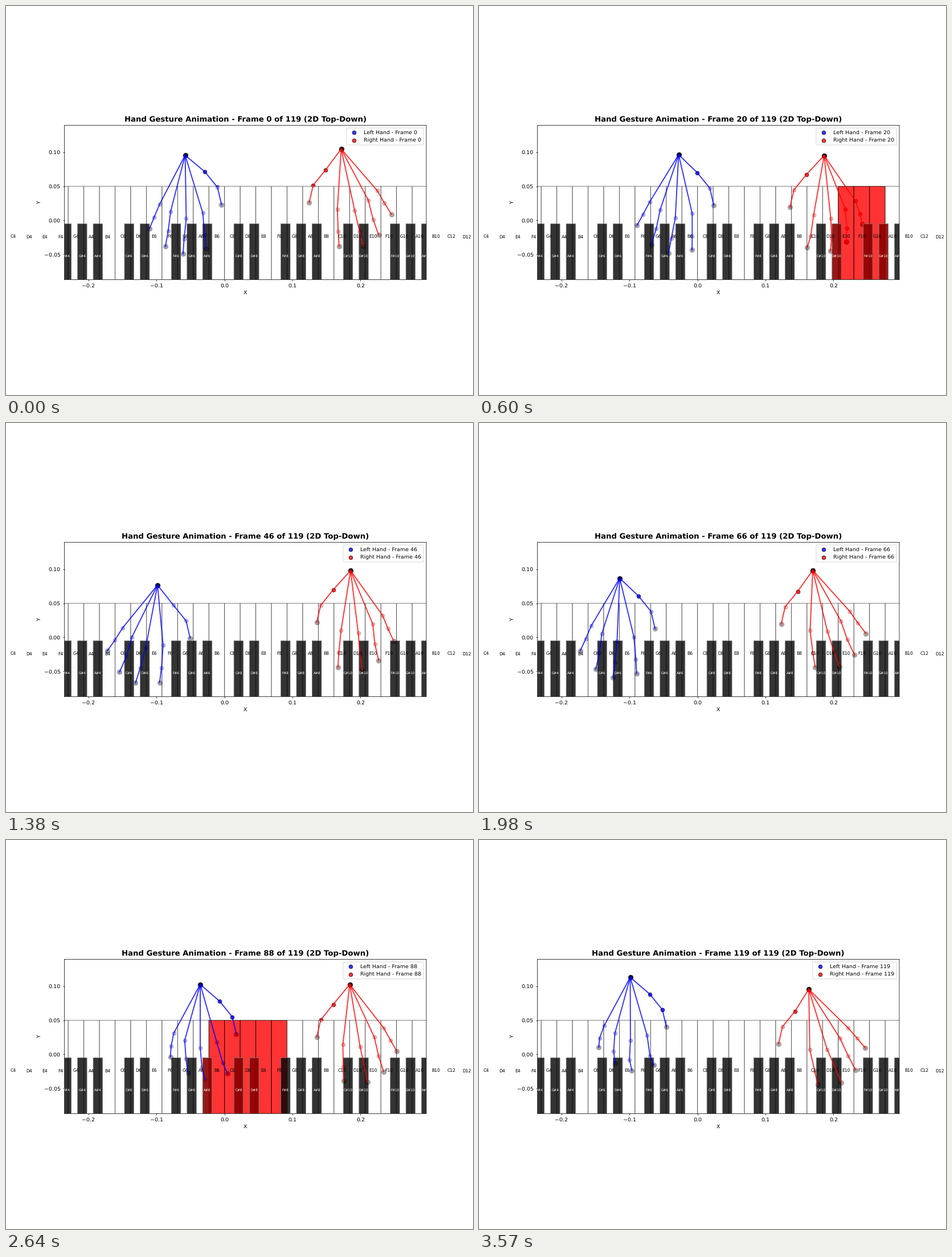
Recreate the animation shown at these times as a matplotlib script. Size 820 by 683 pixels, loop 3600 ms.

```python
import numpy as np
import matplotlib.pyplot as plt
from matplotlib.animation import FuncAnimation
from matplotlib.patches import Rectangle

FRAMES, INTERVAL = 120, 30
DPI = 820 / 12
SCALE, X0, Y0 = 1193.75, 383.7, 376.3   # stage pixels per unit, origin
KEY_W, KEY_BOTTOM = 0.023, -0.1
SEMITONES = dict(C=0, D=2, E=4, F=5, G=7, A=9, B=11)

# Left-hand bones from the wrist outwards: (length, angle from straight down).
# The right hand is the mirror image.
FINGERS = {
    "thumb": [(45.5, 50), (35, 39), (31, 13)],
    "index": [(106, 17), (39, 5), (24, 6)],
    "middle": [(111, 1), (36.5, -6), (26, -4)],
    "ring": [(102, -14.5), (34, -7), (28, -10)],
    "pinky": [(97, -27.5), (24.5, -23), (22, -22)],
}

# Key points: frame, wrist x, wrist y, palm turn, finger lean, finger reach.
LEFT_KEYS = [
    (0, 314.5, 262, 0, 0, 1),
    (20, 350.5, 261, -4, -5, 1.03),
    (36, 346, 263, -4.5, -5, 1.05),
    (46, 266, 284.5, -11.7, -9, 1.08),
    (54, 190, 280, -8, -5, 1.07),
    (66, 247, 272.5, -3.4, 0, 1.05),
    (72, 289, 264, -2.5, 4.5, 0.97),
    (88, 341, 253.5, -1, 11, 0.87),
    (105, 307.5, 244, 0.5, 16, 0.45),
    (119, 265.5, 241, -0.8, 3, 0.75),
]
RIGHT_KEYS = [
    (0, 588.5, 251, -13.4, -7, 1.05),
    (20, 606, 262.5, -7, 3, 0.86),
    (46, 605, 259, -8, 1, 1.07),
    (54, 645, 259, -11, -6, 1.06),
    (66, 586, 258.5, -14.5, -12, 1.06),
    (88, 603.5, 253.5, -10.5, -6, 1.03),
    (105, 592, 250.5, -10.5, -8, 1.05),
    (119, 579, 262, -18, -18, 1),
]

# First frame, last frame, lowest and highest pressed semitone.
PRESSES = [(16, 27, 39, 44), (28, 36, 40, 46), (82, 89, 22, 29)]


def smooth_path(keys):
    """Monotone cubic path through the key points, sampled once per frame."""
    keys = np.array(keys, float)
    t, values = keys[:, 0], keys[:, 1:]
    h = np.diff(t)[:, None]
    d = np.diff(values, axis=0) / h
    same = d[:-1] * d[1:] > 0
    total = np.where(same, d[:-1] + d[1:], 1)
    slope = np.zeros_like(values)
    slope[1:-1] = np.where(same, 2 * d[:-1] * d[1:] / total, 0)

    f = np.arange(FRAMES)
    k = np.clip(np.searchsorted(t, f, side="right") - 1, 0, len(t) - 2)
    u = ((f - t[k]) / h[k, 0])[:, None]
    return ((1 + 2 * u) * (1 - u) ** 2 * values[k]
            + u * (1 - u) ** 2 * h[k] * slope[k]
            + u ** 2 * (3 - 2 * u) * values[k + 1]
            + u ** 2 * (u - 1) * h[k] * slope[k + 1])


def hand_pose(x, y, turn, lean, reach, mirror):
    """Joints of all fingers in data units, shaped (finger, joint, xy)."""
    curl = 1 - reach
    pose = []
    for name, bones in FINGERS.items():
        (l1, a1), (l2, a2), (l3, a3) = bones
        a1 += turn
        if name != "thumb":
            l2, a2 = l2 * (1 - 0.3 * curl), a2 + lean
            l3, a3 = l3 * reach, a3 + lean + 55 * curl
        length, angle = np.array([l1, l2, l3]), np.radians([a1, a2, a3])
        dx = mirror * np.cumsum(np.append(0, length * np.sin(angle)))
        dy = np.cumsum(np.append(0, length * np.cos(angle)))
        pose.append(np.column_stack([(x + dx - X0) / SCALE, (Y0 - y - dy) / SCALE]))
    return np.array(pose)


class Hand:
    def __init__(self, ax, name, color, keys, mirror):
        self.name, self.path, self.mirror = name, smooth_path(keys), mirror
        self.lines = [ax.plot([], [], color=color, lw=2, alpha=0.8, zorder=2)[0]
                      for _ in FINGERS]
        self.joints = ax.scatter([], [], s=50, c=color, edgecolors="black",
                                 linewidths=0.9, alpha=0.8, zorder=1, label=name)
        self.ends = ax.scatter([], [], s=80, c="black", edgecolors="black",
                               linewidths=1, alpha=0.7, zorder=1.05)

    def update(self, frame):
        fingers = hand_pose(*self.path[frame], self.mirror)
        for line, pts in zip(self.lines, fingers):
            line.set_data(pts[:, 0], pts[:, 1])
        wrist = fingers[0, :1]
        self.joints.set_offsets(np.vstack([wrist, fingers[:, 1:].reshape(-1, 2)]))
        self.ends.set_offsets(np.vstack([wrist, fingers[:, 3]]))


def add_key(ax, x, width, top, label, size, color, zorder):
    key = Rectangle((x, KEY_BOTTOM), width, top - KEY_BOTTOM, zorder=zorder)
    ax.add_patch(key)
    ax.text(x + width / 2, (top + KEY_BOTTOM) / 2, label, fontsize=size,
            color=color, ha="center", va="center", zorder=3)
    return key


def style(key, face, edge, alpha, lw):
    key.set(facecolor=face, edgecolor=edge, alpha=alpha, linewidth=lw)


# Soft, unsnapped lines and unhinted text.
plt.rcParams.update({"path.snap": False, "text.hinting": "no_hinting"})

# The small excess keeps the pixel size from rounding down.
fig = plt.figure(figsize=(820.001 / DPI, 683.001 / DPI), dpi=DPI, facecolor="white")
ax = fig.add_subplot()
ax.set_xlim(-0.2356, 0.2968)
ax.set_ylim(-0.0872, 0.1398)
ax.set_aspect("equal")
ax.set_xticks([-0.2, -0.1, 0, 0.1, 0.2])
ax.set_yticks([-0.05, 0, 0.05, 0.1])
ax.set_xlabel("X")
ax.set_ylabel("Y")
title = ax.set_title("", fontsize=14, fontweight="bold")

hands = [Hand(ax, "Left Hand", "blue", LEFT_KEYS, 1),
         Hand(ax, "Right Hand", "red", RIGHT_KEYS, -1)]

# Keys by semitone, counted from the lowest C.
white_keys, black_keys = {}, {}
for i in range(30):
    octave, step = divmod(i, 7)
    note, number = "CDEFGAB"[step], 4 + 2 * octave
    x, tone = (i - 14) * KEY_W, 12 * octave + SEMITONES[note]
    white_keys[tone] = add_key(ax, x, KEY_W, 0.05, f"{note}{number}", 8, "black", 1.1)
    if note not in "EB":
        black_keys[tone + 1] = add_key(ax, x + 0.6 * KEY_W, 0.6 * KEY_W, -0.005,
                                       f"{note}#{number}", 6, "white", 1.2)

legend = ax.legend(handles=[h.joints for h in hands], loc="upper right")


def update(frame):
    title.set_text(f"Hand Gesture Animation - Frame {frame} of {FRAMES - 1} (2D Top-Down)")
    for hand, text in zip(hands, legend.get_texts()):
        hand.update(frame)
        text.set_text(f"{hand.name} - Frame {frame}")

    def pressed(tone):
        return any(first <= frame <= last and low <= tone <= high
                   for first, last, low, high in PRESSES)

    for tone, key in white_keys.items():
        if pressed(tone):
            style(key, "red", "black", 0.8, 1)
        else:
            style(key, "white", "black", 0.6, 0.9)
    for tone, key in black_keys.items():
        if pressed(tone):
            style(key, "darkred", "gray", 0.9, 1)
        else:
            style(key, "black", "gray", 0.8, 0.9)
    return []


anim = FuncAnimation(fig, update, frames=FRAMES, interval=INTERVAL,
                     init_func=lambda: update(0), repeat=True, repeat_delay=0)
plt.show()
```
